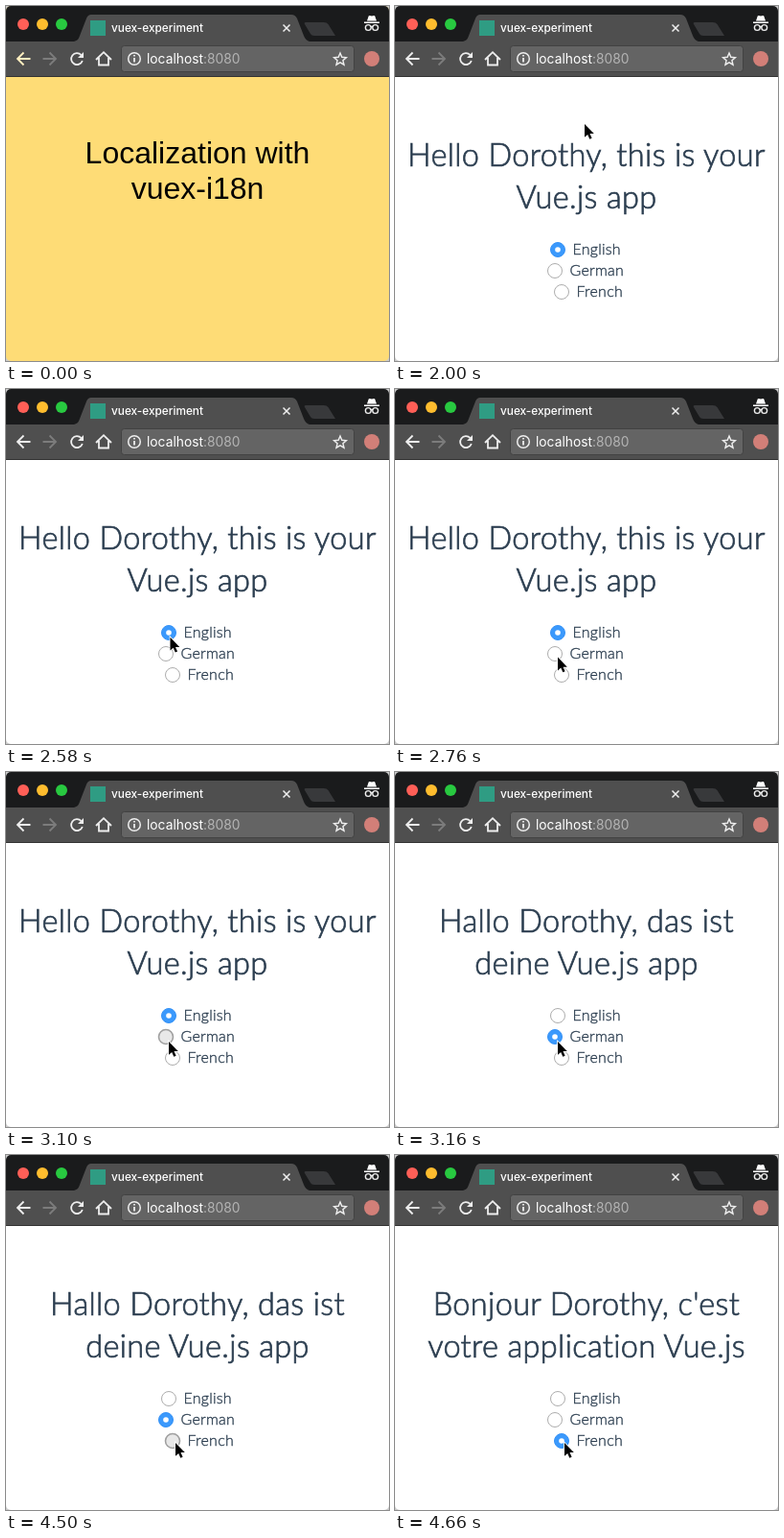
Recreate the animation shown at these times as an HTML page. Size 400x370 px, loop 6180 ms.

```html
<!DOCTYPE html>
<html lang="en">
<head>
<meta charset="utf-8">
<title>vuex-experiment</title>
<style>
html, body { margin: 0; width: 100%; height: 100%; overflow: hidden; background: #ccc; }
svg { display: block; width: 400px; height: 370px; border-radius: 5px; }
.ui { font-family: Inter, Roboto, sans-serif; }
.intro { font: 32px "Liberation Sans", Arial, sans-serif; text-anchor: middle; }
.app { font-family: Lato, "Open Sans", sans-serif; }
.app text { fill: #2c3e50; stroke: #2c3e50; stroke-width: .022em; font-weight: 300; }
.head { font-size: 32.5px; letter-spacing: .35px; text-anchor: middle; }
.label { font-size: 16px; letter-spacing: .25px; }
.line { fill: none; stroke: #eee; stroke-width: 1.8; }
</style>
</head>
<body>
<svg viewBox="0 0 400 370">
  <rect id="page" width="400" height="370"/>

  <!-- browser frame -->
  <rect width="400" height="37" fill="#1a1b1c"/>
  <rect y="37" width="400" height="36" fill="#4f4f4f"/>
  <rect y="73" width="400" height="1" fill="#333"/>
  <path d="M71 37C75 36 76 34 77 31L84 13Q85.500 9 89 9H298Q302 9 304 13L311 31Q313 36 317 37Z" fill="#4f4f4f"/>
  <path d="M313 17H332Q335 17 336.500 19L344 31H322Q319 31 318 29L312 19Q311 17 313 17Z" fill="#38393b"/>
  <circle cx="18" cy="19" r="6" fill="#ff5f57"/>
  <circle cx="38" cy="19" r="6" fill="#ffbd2e"/>
  <circle cx="58" cy="19" r="6" fill="#28c940"/>
  <rect x="88" y="15" width="16" height="16" fill="#2f9c83"/>
  <g class="ui" fill="#fff">
    <text x="110" y="27" font-size="11.8" font-weight="500">vuex-experiment</text>
    <rect x="120.500" y="41.500" width="243" height="27" rx="3" fill="#646464" stroke="#424242"/>
    <text x="147" y="60" font-size="13.8">localhost<tspan fill="#b4b4b4">:8080</tspan></text>
  </g>
  <g class="line">
    <path d="M289.500 19.500l7 7m0-7l-7 7" stroke-width="1.500"/>
    <path id="back" d="M25.500 55H12M18.500 48.500L12 55l6.500 6.500"/>
    <path d="M38.500 55H52M45.500 48.500L52 55l-6.500 6.500" stroke="#7c7c7c"/>
    <path d="M78.500 51A6 6 0 1 0 79.800 57"/>
    <path d="M81 48v6h-6z" fill="#eee" stroke="none"/>
    <path d="M94 56l8-7.800 8 7.800M97 54v7.500h10V54"/>
    <circle cx="134" cy="55" r="6.300" stroke-width="1.500"/>
    <path d="M134 54v4.500M134 51v1.600"/>
    <path d="M349 49l1.800 4.300 4.600.4-3.500 3 1.100 4.500-4-2.400-4 2.400 1.100-4.500-3.500-3 4.600-.4z" stroke-width="1.400"/>
    <g stroke-width="1.400">
      <circle cx="378.300" cy="22.500" r="2.900"/>
      <circle cx="385.700" cy="22.500" r="2.900"/>
      <path d="M381 22q1-1 2 0"/>
    </g>
  </g>
  <path d="M374 16.500H390V18H374ZM377 15.500L378.700 10.500Q379 9.800 380 10L382 10.500 384 10Q385 9.800 385.300 10.500L387 15.500Z" fill="#fff"/>
  <circle cx="382" cy="55" r="8" fill="#d27f78"/>

  <g id="intro" class="intro">
    <text x="200" y="164">Localization with</text>
    <text x="200" y="201">vuex-i18n</text>
  </g>

  <g id="app" class="app">
    <text class="head" x="200" y="167"></text>
    <text class="head" x="200" y="211"></text>
    <g id="radios"></g>
    <path id="cursor" d="M0 0V13.800L3.200 10.900 5.300 15.700 7.600 14.700 5.500 10.100H9.800Z" fill="#000" stroke="#fff" stroke-width="1.600" paint-order="stroke"/>
  </g>
</svg>
<script>
const LOOP = 6180;
const options = [
  { name: "English", x: 170, lines: ["Hello Dorothy, this is your", "Vue.js app"] },
  { name: "German", x: 167, lines: ["Hallo Dorothy, das ist", "deine Vue.js app"] },
  { name: "French", x: 174, lines: ["Bonjour Dorothy, c'est", "votre application Vue.js"] }
];
const byId = id => document.getElementById(id);
const heads = document.querySelectorAll(".head");

byId("radios").innerHTML = options.map(({ name, x }, i) => {
  const y = 254 + 22 * i;
  return `<circle class="ring" cx="${x}" cy="${y}" r="7.500"/>
    <circle class="dot" cx="${x}" cy="${y}" r="2.800" fill="#fff"/>
    <text class="label" x="${x + 15.5}" y="${y + 5}">${name}</text>`;
}).join("");
const rings = document.querySelectorAll(".ring");
const dots = document.querySelectorAll(".dot");

const clamp = v => Math.min(1, Math.max(0, v));

// The pointer moves in small discrete steps.
function pointer(t) {
  if (t < 3980) {
    const stepped = Math.floor(t / 60) * 60;
    const rest = t < 2240 ? 1 : 1 - clamp((stepped - 2180) / 640);
    return [170 + 28 * rest ** 3, 281 - 158 * rest ** 2];
  }
  const u = clamp((Math.floor((t - 3980) / (220 / 3)) + 1) / 4);
  const p = u * u * (3 - 2 * u);
  return [170 + 7 * p, 281 + 19 * p];
}

function paintRadio(i, chosen, pressed) {
  const on = i === chosen, down = i === pressed;
  rings[i].setAttribute("fill", on ? "#3b99fc" : down ? "#e8e8e8" : "#fff");
  rings[i].setAttribute("stroke", on ? "#3491f6" : down ? "#a0a0a0" : "#adadad");
  rings[i].setAttribute("stroke-width", down ? 1.6 : 1);
  dots[i].setAttribute("visibility", on ? "inherit" : "hidden");
}

function draw(t) {
  const intro = t < 2000;
  byId("page").setAttribute("fill", intro ? "#fedc76" : "#fff");
  byId("intro").setAttribute("visibility", intro ? "visible" : "hidden");
  byId("app").setAttribute("visibility", intro ? "hidden" : "visible");
  byId("back").setAttribute("stroke", intro ? "#fff0c0" : "#eee");

  const chosen = t < 3160 ? 0 : t < 4660 ? 1 : 2;
  const pressed = t >= 3040 && t < 3160 ? 1 : t >= 4500 && t < 4660 ? 2 : -1;
  heads.forEach((el, i) => { el.textContent = options[chosen].lines[i]; });
  options.forEach((_, i) => paintRadio(i, chosen, pressed));
  byId("cursor").setAttribute("transform", `translate(${pointer(t)})`);
}

function tick() {
  draw(performance.now() % LOOP);
  requestAnimationFrame(tick);
}
tick();
</script>
</body>
</html>
```
